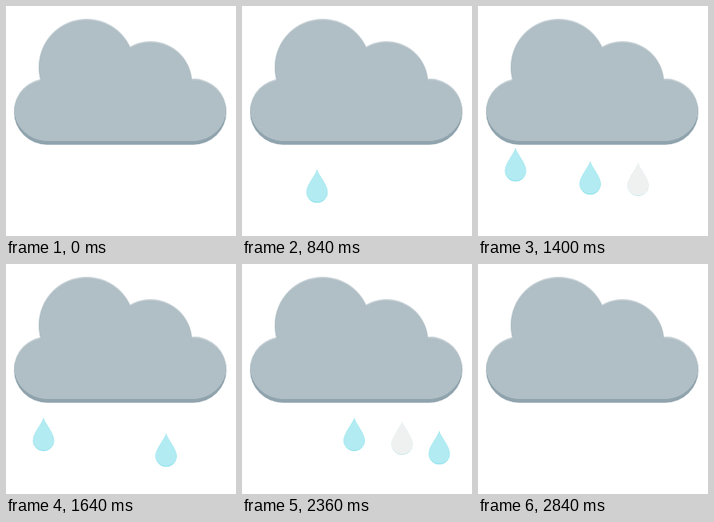
An HTML page that plays this animation: 288 by 288 pixels, repeating every 2.88 s.

```html
<!DOCTYPE html>
<html lang="en">
<head>
<meta charset="utf-8">
<title>Rain cloud</title>
<style>
  html, body { margin: 0; width: 100%; height: 100%; overflow: hidden; background: #fff; }
  svg { display: block; width: 100%; height: 100%; }
</style>
</head>
<body>
<svg viewBox="0 0 288 288">
  <defs>
    <rect id="base" x="10" y="91" width="266" height="82.7" rx="41.3"/>
    <g id="puffs">
      <circle cx="101" cy="76" r="60"/>
      <circle cx="181" cy="96" r="52"/>
    </g>
    <clipPath id="outer"><use href="#base"/></clipPath>
    <clipPath id="inner"><use href="#base" y="1.5"/></clipPath>
    <g id="drop">
      <path class="rim" d="M0 0C2 8 13.3 19 13.3 28.5A13.3 13.3 0 0 1-13.3 28.5C-13.3 19-2 8 0 0Z"/>
      <path class="body" d="M0 0C2 8 13.3 19 13.3 28.5A13.3 12.3 0 0 1-13.3 28.5C-13.3 19-2 8 0 0Z"/>
    </g>
  </defs>
  <g id="rain"></g>
  <use href="#base" fill="#90a4ae"/>
  <g fill="#c8d2d7">
    <g clip-path="url(#outer)"><use href="#base" y="-5"/></g>
    <use href="#puffs"/>
  </g>
  <g fill="#b0bec5">
    <g clip-path="url(#inner)"><use href="#base" y="-5"/></g>
    <use href="#puffs" y="1.5"/>
  </g>
</svg>
<script>
const LOOP = 2880, STEP = 40, FALL = 600;
const UPPER = [171, 197], LOWER = [194, 224];

// Each column: centre x, vertical range of the drop tip, start times in ms.
const columns = [
  { x: 47,    range: UPPER, starts: [0, 1200] },
  { x: 94,    range: LOWER, starts: [600, 1660] },
  { x: 140.5, range: UPPER, starts: [920, 1920] },
  { x: 200.5, range: LOWER, starts: [1300, 2240] },
  { x: 247,   range: LOWER, starts: [2060] }
];

const rain = document.getElementById('rain');
const template = document.getElementById('drop');
for (const column of columns) {
  column.node = template.cloneNode(true);
  column.node.removeAttribute('id');
  rain.append(column.node);
}

const smooth = p => p * p * (3 - 2 * p);

function draw(time) {
  for (const { x, range: [top, bottom], starts, node } of columns) {
    const start = starts.find(s => time > s && time < s + FALL);
    node.style.display = start === undefined ? 'none' : '';
    if (start === undefined) continue;
    const p = (time - start) / FALL;
    const faint = p < 0.25 || p > 0.85;
    node.setAttribute('transform', `translate(${x} ${top + (bottom - top) * smooth(p)})`);
    node.querySelector('.rim').setAttribute('fill', faint ? '#c4e6ea' : '#80deea');
    node.querySelector('.body').setAttribute('fill', faint ? '#eff1f1' : '#b2ebf2');
  }
}

function tick() {
  draw(Math.floor(performance.now() % LOOP / STEP) * STEP);
  requestAnimationFrame(tick);
}
tick();
</script>
</body>
</html>
```
